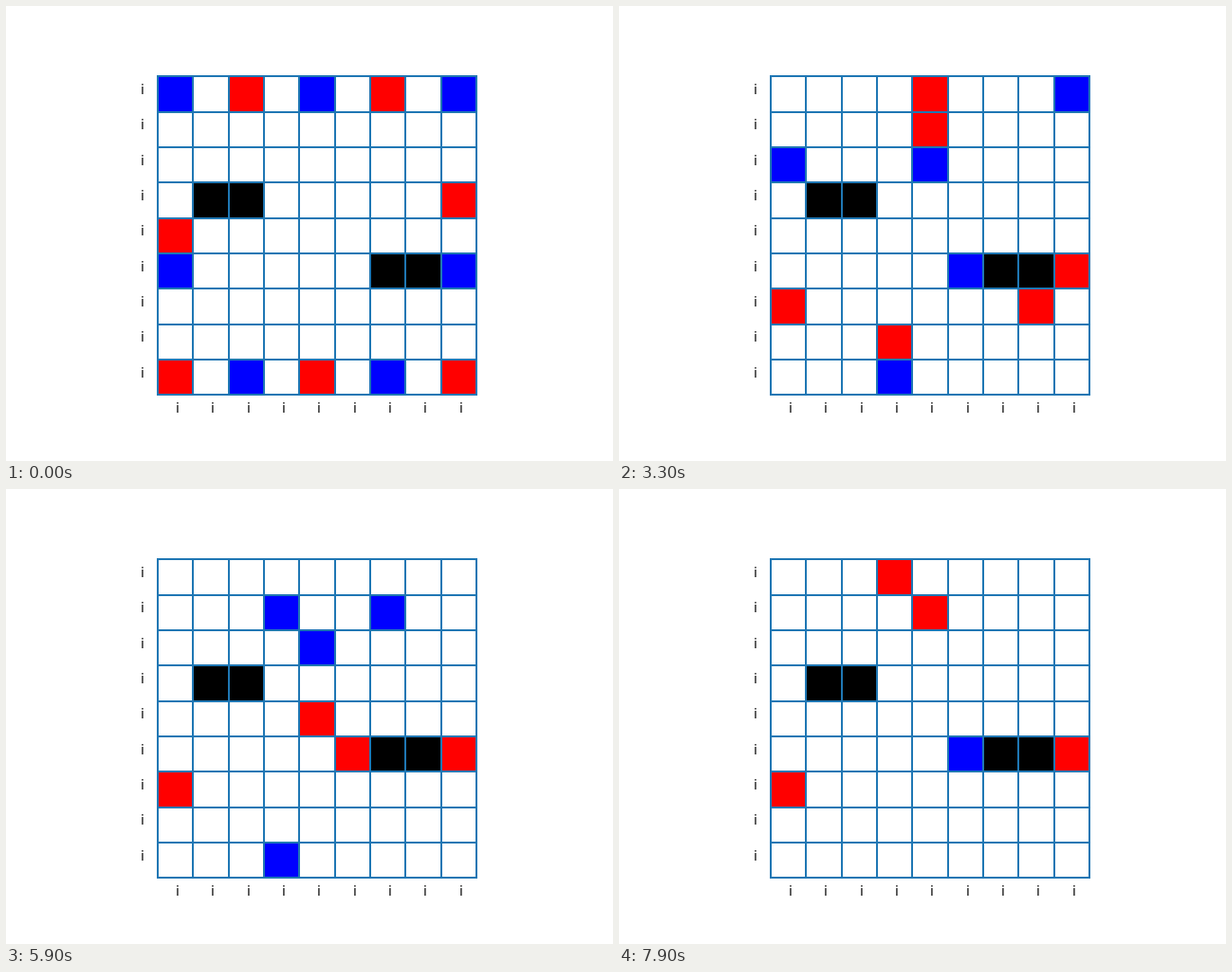
These frames come from a looping animation (640 px wide and 480 px high, 8000 ms). An HTML page with a canvas:

```html
<!DOCTYPE html>
<html lang="en">
<head>
<meta charset="utf-8">
<title>Board game</title>
<style>
  html, body { margin: 0; width: 100%; height: 100%; overflow: hidden; background: #fff; }
  canvas { display: block; }
</style>
</head>
<body>
<canvas id="board" width="640" height="480"></canvas>
<script>
const ctx = document.getElementById('board').getContext('2d');
const SIZE = 9, CELL = 336 / SIZE, LEFT = 160, TOP = 74.4;
const STEP_MS = 100, STEPS = 80;
const BLUE = '#0000ff', RED = '#ff0000', WALL = '#000000', GRID = '#1f77b4';
const DIRS = { U: [0, -1], D: [0, 1], L: [-1, 0], R: [1, 0] };

// Squares are "column row"; a run is a start square followed by its steps.
const START = {
  [BLUE]: '00 40 80 05 85 28 68',
  [RED]: '20 60 83 04 08 48 88',
  [WALL]: '13 23 65 75'
};
const RUNS = {
  [BLUE]: '28R 68L 85D 05RRRRUUL 33UR 58UUU 00DDRRUR 55DLDRUU 80LLDLLU 38RUDURUU',
  [RED]: '83D 88U 84D 04D 87U 05D 08UR 60L 20RRD 50L 17RR 86LLD 40RDDDDLD ' +
         '67ULU 45UU 55UUU 43LU 52LU 32UU'
};

function shift(square, dir) {
  const [dx, dy] = DIRS[dir];
  return `${+square[0] + dx}${+square[1] + dy}`;
}

const neighbours = square => Object.keys(DIRS).map(dir => shift(square, dir));

function listMoves(runs) {
  return runs.split(' ').flatMap(run => {
    let from = run.slice(0, 2);
    return [...run.slice(2)].map(dir => {
      const to = shift(from, dir);
      const move = [from, to];
      from = to;
      return move;
    });
  });
}

// A piece is taken when the mover's side touches it on two sides.
function play(board, [from, to], side, enemy) {
  const next = new Map(board);
  next.delete(from);
  next.set(to, side);
  for (const spot of neighbours(to)) {
    if (next.get(spot) !== enemy) continue;
    const attackers = neighbours(spot).filter(n => next.get(n) === side);
    if (attackers.length >= 2) next.delete(spot);
  }
  return next;
}

function buildBoards() {
  let board = new Map();
  for (const colour in START) {
    for (const square of START[colour].split(' ')) board.set(square, colour);
  }
  const moves = { [BLUE]: listMoves(RUNS[BLUE]), [RED]: listMoves(RUNS[RED]) };
  const boards = [board];
  for (let i = 1; i < STEPS; i++) {
    const [side, enemy] = i % 2 ? [BLUE, RED] : [RED, BLUE];
    board = play(board, moves[side].shift(), side, enemy);
    boards.push(board);
  }
  return boards;
}

const gridX = i => Math.round(LEFT + i * CELL);
const gridY = i => Math.round(TOP + i * CELL);

function draw(board) {
  ctx.fillStyle = '#fff';
  ctx.fillRect(0, 0, 640, 480);

  for (const [square, colour] of board) {
    const col = +square[0], row = +square[1];
    const x = gridX(col), y = gridY(row);
    ctx.fillStyle = colour;
    ctx.fillRect(x, y, gridX(col + 1) - x, gridY(row + 1) - y);
  }

  ctx.fillStyle = GRID;
  for (let i = 0; i <= SIZE; i++) {
    ctx.fillRect(gridX(i) - 1, gridY(0) - 1, 2, gridY(SIZE) - gridY(0) + 2);
    ctx.fillRect(gridX(0) - 1, gridY(i) - 1, gridX(SIZE) - gridX(0) + 2, 2);
  }

  ctx.fillStyle = '#000';
  ctx.font = '13.89px "DejaVu Sans", sans-serif';
  const textX = i => Math.ceil(LEFT + i * CELL);
  for (let i = 0; i < SIZE; i++) {
    ctx.fillText('i', textX(-0.5), gridY(i + 0.5));
    ctx.fillText('i', textX(i + 0.5), gridY(SIZE + 0.5));
  }
}

const boards = buildBoards();
const begin = performance.now();
let shown = -1;

function tick() {
  const elapsed = Math.max(0, performance.now() - begin);
  const step = Math.floor(elapsed / STEP_MS) % STEPS;
  if (step !== shown) {
    draw(boards[step]);
    shown = step;
  }
  requestAnimationFrame(tick);
}
tick();
</script>
</body>
</html>
```
